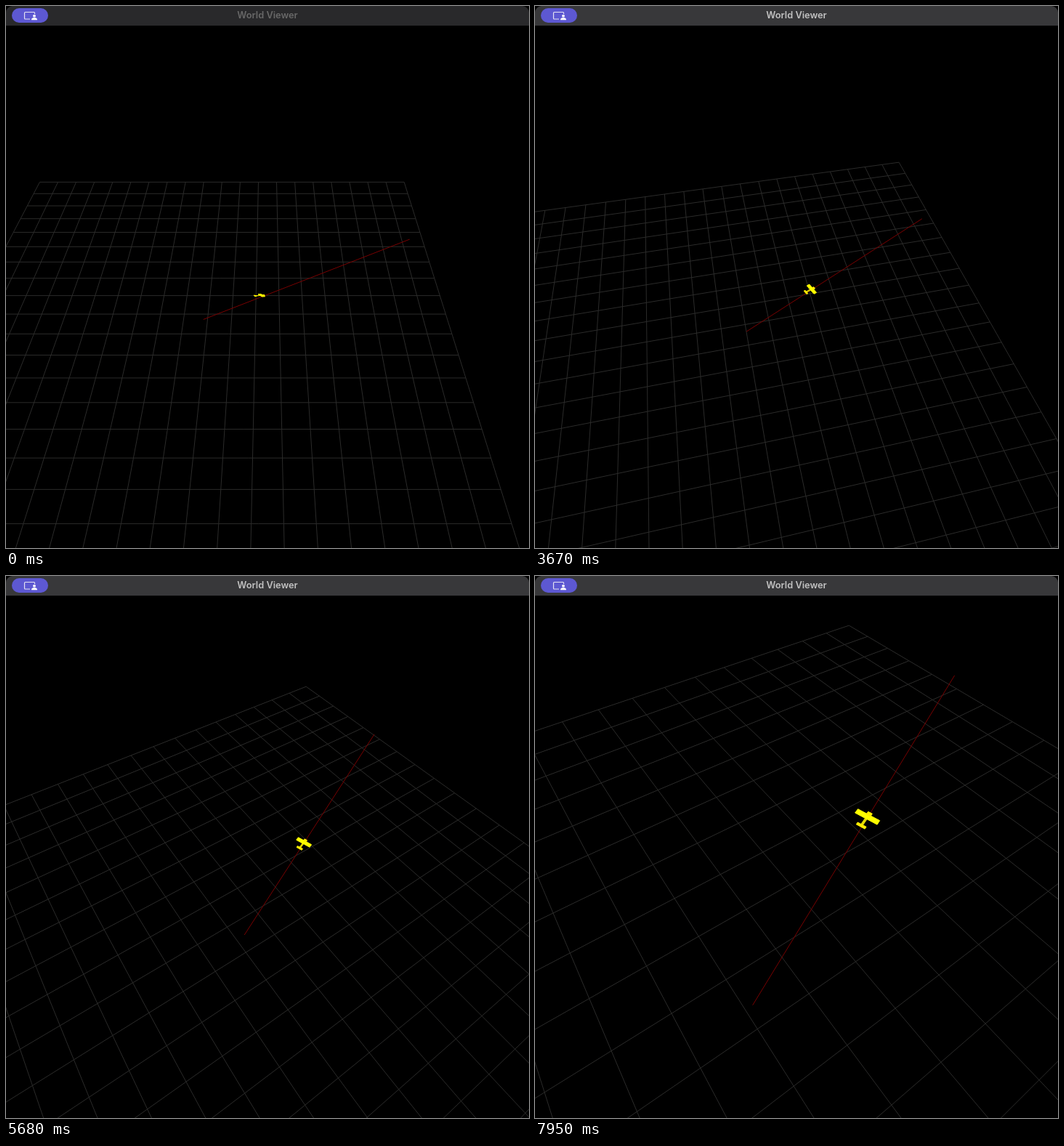
An HTML page with a canvas that plays this animation: 720 by 746 pixels, repeating every 7990 ms.

```html
<!DOCTYPE html>
<html lang="en">
<head>
<meta charset="utf-8">
<title>World Viewer</title>
<style>
  html, body { margin: 0; width: 100%; height: 100%; overflow: hidden; background: #000; }
  canvas { position: absolute; left: 0; top: 0; display: block; }
  #bar {
    position: absolute; left: 0; top: 0; width: 720px; height: 27px;
    border-radius: 9px 9px 0 0; background: #29292b;
    font: 600 12.8px/26px Inter, "Open Sans", sans-serif;
    text-align: center; color: #686868;
  }
  #bar.active { background: #38383a; color: #c2c2c2; }
  #bar svg { position: absolute; left: 8px; top: 3px; }
</style>
</head>
<body>
<canvas id="view" width="720" height="746"></canvas>
<div id="bar">
  <svg width="50" height="20" viewBox="0 0 50 20">
    <rect width="50" height="20" rx="10" fill="#5d58d2"/>
    <path d="M25 15H18.500a1 1 0 0 1-1-1V6.500a1 1 0 0 1 1-1H30.500a1 1 0 0 1 1 1V8" fill="none" stroke="#e4e2f2" stroke-width="1.2"/>
    <circle cx="31" cy="10.700" r="1.900" fill="#fff"/>
    <path d="M27 16.300a4 3.300 0 0 1 8 0z" fill="#fff"/>
  </svg>
  World Viewer
</div>
<script>
const LOOP = 7990;
const FOCUS_AT = 3200;
const FOCAL = 622.6, CENTER_X = 360, CENTER_Y = 386.5, NEAR = 0.2;
const TARGET = [2.5, 2.5];
const HEADING = [2 / Math.sqrt(5), 1 / Math.sqrt(5)];
const ALTITUDE = 1;

// Camera moves: rows of [time, value]
const YAW = [[3230, 0], [3670, 12], [4480, 35]];
const PITCH = [[3230, 50], [3670, 52], [4480, 51]];
const DISTANCE = [[4790, 20], [5680, 15], [6700, 10.08], [6880, 9.3]];

const ctx = document.getElementById('view').getContext('2d');
const bar = document.getElementById('bar');
const rad = deg => deg * Math.PI / 180;

function sample(keys, t) {
  if (t <= keys[0][0]) return keys[0][1];
  for (let i = 1; i < keys.length; i++) {
    const [t0, a] = keys[i - 1], [t1, b] = keys[i];
    if (t < t1) return a + (b - a) * (t - t0) / (t1 - t0);
  }
  return keys[keys.length - 1][1];
}

function makeCamera(t) {
  const yaw = rad(sample(YAW, t)), pitch = rad(sample(PITCH, t));
  const distance = sample(DISTANCE, t);
  const cy = Math.cos(yaw), sy = Math.sin(yaw);
  const cp = Math.cos(pitch), sp = Math.sin(pitch);
  return ([x, v, h]) => {
    const dx = x - TARGET[0], dv = v - TARGET[1];
    const right = dx * cy - dv * sy, ahead = dx * sy + dv * cy;
    return [right, -ahead * sp - h * cp, distance + ahead * cp - h * sp];
  };
}

const project = ([x, y, z]) => [CENTER_X + FOCAL * x / z, CENTER_Y + FOCAL * y / z];

function line(camera, from, to) {
  let a = camera(from), b = camera(to);
  if (a[2] < b[2]) [a, b] = [b, a];
  if (a[2] < NEAR) return;
  if (b[2] < NEAR) {
    const k = (a[2] - NEAR) / (a[2] - b[2]);
    b = a.map((c, i) => c + (b[i] - c) * k);
  }
  ctx.moveTo(...project(a));
  ctx.lineTo(...project(b));
}

function drawGrid(camera) {
  ctx.strokeStyle = '#2b2b2a';
  ctx.lineWidth = 1;
  ctx.beginPath();
  for (let i = -10; i <= 10; i++) {
    line(camera, [i, -10, 0], [i, 10, 0]);
    line(camera, [-10, i, 0], [10, i, 0]);
  }
  ctx.stroke();
}

function drawTrack(camera) {
  ctx.strokeStyle = '#780000';
  ctx.beginPath();
  line(camera, [0, 0, ALTITUDE], [HEADING[0] * 10, HEADING[1] * 10, ALTITUDE]);
  ctx.stroke();
}

function drawPlane(camera, t) {
  // The plane levels out after a banked dive
  const settle = Math.exp(-t / 800);
  const along = 2.52 + 0.2 * t / 1000;
  const nose = rad(-8 - 16 * settle), roll = rad(-11 + 46 * settle);
  const [hx, hv] = HEADING;
  const forward = [hx * Math.cos(nose), hv * Math.cos(nose), Math.sin(nose)];
  const side = [hv * Math.cos(roll), -hx * Math.cos(roll), Math.sin(roll)];
  const origin = [hx * along, hv * along, ALTITUDE + 0.04 + 0.06 * settle];

  // A flat panel between two stations along the body
  const panel = (front, back, halfSpan, color) => {
    ctx.beginPath();
    for (const [f, s] of [[front, -halfSpan], [front, halfSpan], [back, halfSpan], [back, -halfSpan]]) {
      ctx.lineTo(...project(camera(origin.map((o, i) => o + forward[i] * f + side[i] * s))));
    }
    ctx.closePath();
    ctx.fillStyle = ctx.strokeStyle = color;
    ctx.fill();
    ctx.stroke();
  };
  ctx.lineJoin = 'round';
  panel(0.14, -0.33, 0.02, '#e6dc00');
  panel(-0.27, -0.34, 0.09, '#ffee00');
  panel(0.075, -0.065, 0.235, '#ffff00');
  panel(0.15, 0.05, 0.045, '#fff000');
}

function draw(t) {
  const camera = makeCamera(t);
  bar.className = t >= FOCUS_AT ? 'active' : '';
  ctx.fillStyle = '#000';
  ctx.fillRect(0, 0, 720, 746);
  drawGrid(camera);
  drawTrack(camera);
  drawPlane(camera, t);
}

const start = performance.now();
function tick() {
  draw((performance.now() - start) % LOOP);
  requestAnimationFrame(tick);
}
tick();
</script>
</body>
</html>
```
